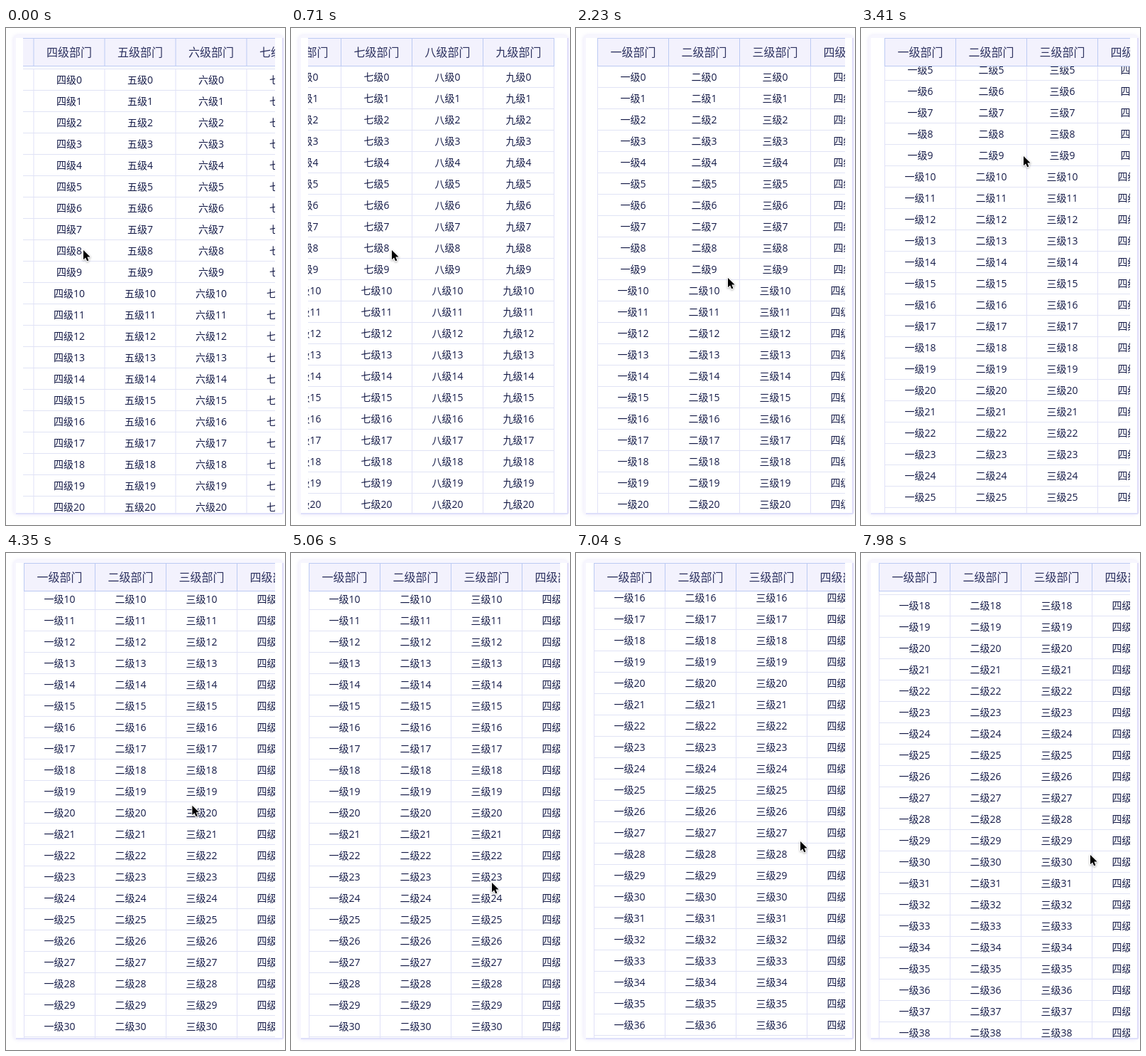
Animation of 393x698 px, one loop 8 s. Source, as an HTML page with a canvas:

```html
<!DOCTYPE html>
<html lang="zh-CN">
<head>
<meta charset="utf-8">
<title>部门表格</title>
<style>
html, body { margin: 0; width: 100%; height: 100%; overflow: hidden; background: #fff; }
canvas { display: block; width: 393px; height: 698px; }
</style>
</head>
<body>
<canvas id="stage"></canvas>
<script>
const W = 393, H = 698, LOOP = 8000, STEP = 117.5;
const LEFT = 24, TOP = 14, RIGHT = 379, BOTTOM = 681;
const HEAD = 39, COL = 100, ROW = 30;
const LEVELS = [...'一二三四五六七八九'];
const FONT = '"Open Sans", "Noto Sans CJK SC", "Noto Sans CJK", sans-serif';

const canvas = document.getElementById('stage');
const ctx = canvas.getContext('2d');
const dpr = window.devicePixelRatio || 1;
canvas.width = Math.round(W * dpr);
canvas.height = Math.round(H * dpr);

// Swipes and pointer moves are sums of eased shifts.
function poseAt(t) {
  const go = (from, to, shift) => {
    const u = Math.min(1, Math.max(0, (t - from) / (to - from)));
    return shift * u * u * (3 - 2 * u);
  };
  return {
    scrollX: 285.5 + go(0, 700, 268.5) - go(820, 2100, 560) - go(2600, 3300, 3) + go(3450, 3900, 8),
    scrollY: -4 + go(0, 400, 4) + go(2500, 4254, 304) + go(5200, 7000, 182) + go(7060, 7900, 49),
    pointerX: 109 + go(100, 650, 33) + go(900, 2200, 72) + go(2500, 3400, 15)
      + go(3450, 5000, 54) + go(5100, 7750, 40),
    pointerY: 312 + go(900, 2200, 39) - go(2500, 3400, 171)
      + go(3450, 5000, 283) - go(5100, 7000, 58) + go(7060, 7900, 19)
  };
}

function box(x, y, w, h, color) {
  ctx.fillStyle = color;
  ctx.fillRect(x, y, w, h);
}

function clipped(x, y, w, h, paint) {
  ctx.save();
  ctx.beginPath();
  ctx.rect(x, y, w, h);
  ctx.clip();
  paint();
  ctx.restore();
}

function drawCard() {
  ctx.save();
  ctx.shadowColor = 'rgba(205, 200, 245, 0.45)';
  ctx.shadowBlur = 5 * dpr;
  ctx.fillStyle = '#f7f6fe';
  ctx.beginPath();
  ctx.roundRect(10.5, 10, 380, 673.5, 6);
  ctx.fill();
  ctx.restore();
  box(14, 14, 375, 667, '#fff');
  box(389, 14, 2, 668, '#dfddf9');
  box(14, 681, 376, 2, '#dedffa');
}

function drawBody(scrollX, scrollY) {
  const x0 = LEFT - scrollX, y0 = TOP + HEAD - scrollY;
  const first = Math.max(0, Math.floor(scrollY / ROW) - 1);
  const last = first + 24;
  for (let r = first; r <= last; r++) {
    box(x0, y0 + r * ROW, COL * 9 + 1, 1, '#e0e3f5');
  }
  for (let c = 0; c <= 9; c++) {
    box(x0 + c * COL, y0, 1, H + scrollY, '#e0e1f8');
  }
  ctx.font = '14px ' + FONT;
  ctx.fillStyle = '#141a47';
  LEVELS.forEach((level, c) => {
    const x = x0 + c * COL + COL / 2 + 0.5;
    if (x < -50 || x > W + 50) return;
    for (let r = first; r <= last; r++) {
      ctx.fillText(level + '级' + r, x, y0 + r * ROW + 21);
    }
  });
}

function drawHead(scrollX) {
  const x0 = LEFT - scrollX, line = '#bccaf3';
  box(x0, TOP, COL * 9 + 1, HEAD + 1, '#f3f2fd');
  box(x0, TOP, COL * 9 + 1, 1, line);
  box(x0, TOP + HEAD, COL * 9 + 1, 1, line);
  for (let c = 0; c <= 9; c++) box(x0 + c * COL, TOP, 1, HEAD + 1, line);
  ctx.font = '16px ' + FONT;
  ctx.fillStyle = '#2c315f';
  LEVELS.forEach((level, c) => {
    ctx.fillText(level + '级部门', x0 + c * COL + COL / 2 + 0.5, TOP + 26);
  });
}

function drawPointer(x, y) {
  ctx.save();
  ctx.translate(x, y);
  ctx.scale(0.94, 0.94);
  const arrow = new Path2D('M0 0V14.2L3.3 11.1L5.5 16.3L7.9 15.3L5.7 10.2H10.2Z');
  ctx.shadowColor = 'rgba(0, 0, 0, 0.35)';
  ctx.shadowBlur = 3 * dpr;
  ctx.shadowOffsetY = dpr;
  ctx.lineJoin = 'round';
  ctx.lineWidth = 2;
  ctx.strokeStyle = '#fff';
  ctx.stroke(arrow);
  ctx.shadowColor = 'transparent';
  ctx.fillStyle = '#000';
  ctx.fill(arrow);
  ctx.restore();
}

function draw(time) {
  // The picture advances in even steps; the offset absorbs timer rounding.
  const t = Math.floor((time % LOOP + 12) / STEP) * STEP;
  const pose = poseAt(t);
  ctx.setTransform(dpr, 0, 0, dpr, 0, 0);
  box(0, 0, W, H, '#fff');
  ctx.textAlign = 'center';
  ctx.textBaseline = 'alphabetic';
  drawCard();
  clipped(LEFT, TOP + HEAD, RIGHT - LEFT, BOTTOM - TOP - HEAD,
    () => drawBody(pose.scrollX, pose.scrollY));
  clipped(LEFT, TOP, RIGHT - LEFT, HEAD + 1, () => drawHead(pose.scrollX));
  drawPointer(pose.pointerX, pose.pointerY);
}

const start = performance.now();
function tick() {
  draw(performance.now() - start);
  requestAnimationFrame(tick);
}
tick();
</script>
</body>
</html>
```
